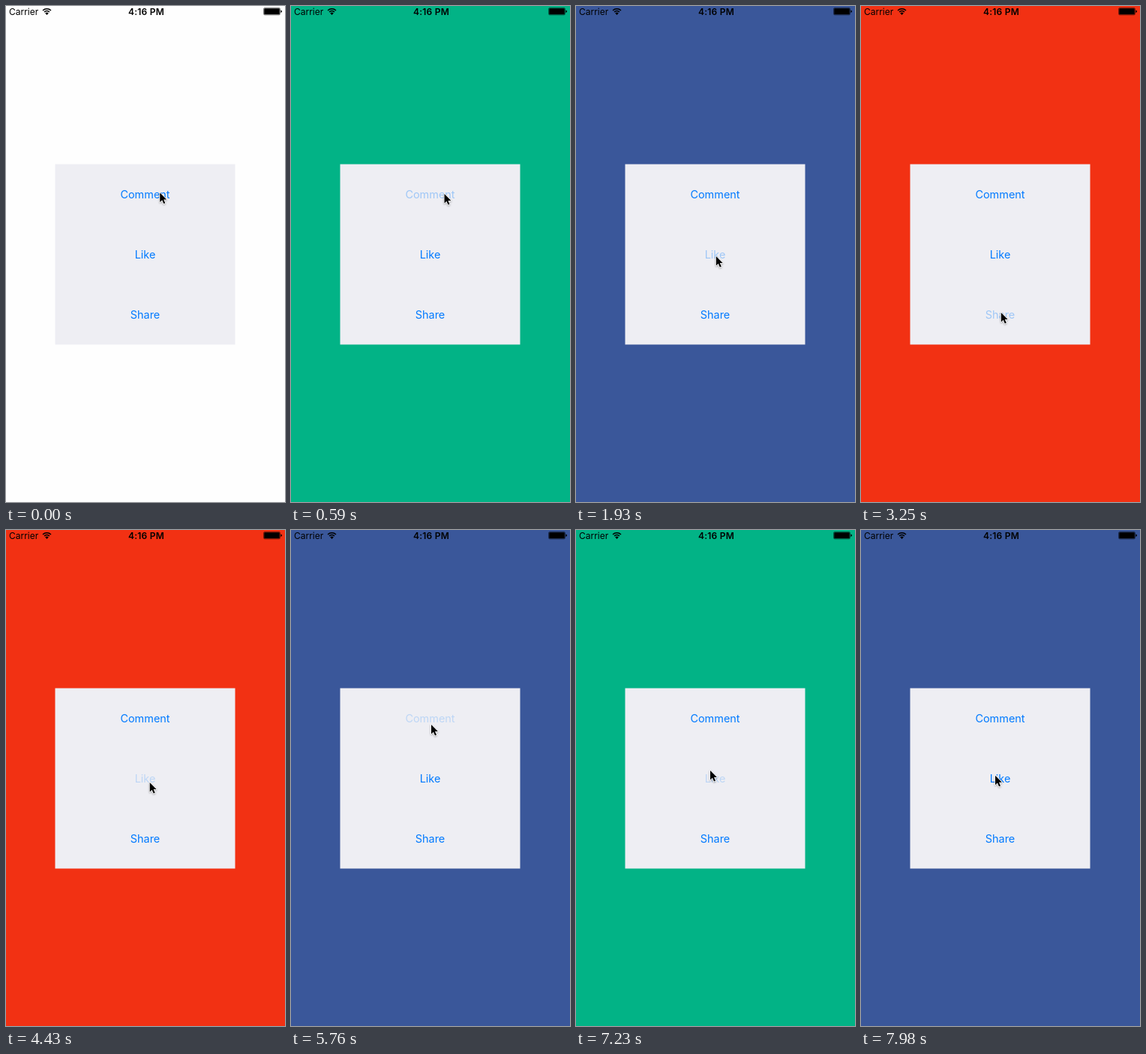
An HTML page that plays this animation: 372 px wide and 660 px high, repeating every 8 s.

```html
<!DOCTYPE html>
<html lang="en">
<head>
<meta charset="utf-8">
<title>Button colours</title>
<style>
  html, body { margin: 0; width: 100%; height: 100%; overflow: hidden; }
  svg { display: block; width: 372px; height: 660px; }
  text { font-family: Inter, Roboto, sans-serif; }
  .status { font-size: 12px; }
  .time { font-weight: 600; letter-spacing: .2px; }
  .button { font-size: 14.45px; fill: #007aff; text-anchor: middle; }
  .cursor { filter: drop-shadow(0 1px 1px rgba(0, 0, 0, .3)); }
</style>
</head>
<body>
<svg viewBox="0 0 372 660">
  <rect id="back" width="372" height="660"/>

  <text class="status" x="4" y="11.5">Carrier</text>
  <g fill="none" stroke="#000" stroke-width="1.6">
    <path d="M49.05 6.05a7.7 7.7 0 0 1 10.9 0M51.05 8.05a4.9 4.9 0 0 1 6.9 0"/>
    <path d="M54.5 11.9l-2.3-2.3a3.25 3.25 0 0 1 4.6 0z" fill="#000" stroke="none"/>
  </g>
  <text class="status time" x="187" y="11.5" text-anchor="middle">4:16 PM</text>
  <rect x="343.5" y="2.5" width="22" height="9.4" rx="1.6" fill="none" stroke="#000" stroke-width=".5"/>
  <rect x="344.2" y="3.2" width="20.6" height="8" rx=".8"/>
  <path d="M366.4 5.5q1.6.3 1.6 1.7t-1.6 1.7z"/>

  <rect x="65.5" y="210.5" width="240" height="240" fill="#eeeef3"/>
  <text class="button" x="185.5" y="256">Comment</text>
  <text class="button" x="185.5" y="336">Like</text>
  <text class="button" x="185.5" y="416">Share</text>

  <path id="cursor" class="cursor" d="M0 0V12.4L2.9 9.7L5 14.6L7 13.7L5 9H8.9Z"
    stroke="#fff" stroke-width="1.6" stroke-linejoin="round" paint-order="stroke"/>
</svg>
<script>
  const LOOP = 8000, TICK = 147.78, LEAD = 12;
  const TRAVEL = 4, PRESSED = 0.2;
  const COLORS = ['#02b386', '#3a579a', '#f23113'];

  // Pointer stops, timed in ticks; a stop with a button is also a tap.
  const stops = [
    { x: 206, y: 247, arrive: 0 },
    { x: 204.5, y: 250, arrive: 2, button: 0, down: 2, up: 4 },
    { x: 186.8, y: 333, arrive: 11, button: 1, down: 11, up: 13 },
    { x: 186.8, y: 408, arrive: 20, button: 2, down: 20, up: 22 },
    { x: 191.7, y: 336, arrive: 28, button: 1, down: 30, up: 33 },
    { x: 187, y: 259, arrive: 39, button: 0, down: 39, up: 43 },
    { x: 179, y: 320, arrive: 49, button: 1, down: 49, up: 52 },
    { x: 179, y: 328, arrive: 55 }
  ];

  const back = document.getElementById('back');
  const cursor = document.getElementById('cursor');
  const buttons = document.querySelectorAll('.button');

  const clamp = u => Math.min(1, Math.max(0, u));
  const smooth = u => u * u * (3 - 2 * u);
  const latest = test => stops.filter(test).pop();

  function tipAt(tick) {
    return stops.reduce(([x, y], stop) => {
      const e = smooth(clamp((tick - stop.arrive) / TRAVEL + 1));
      return [x + (stop.x - x) * e, y + (stop.y - y) * e];
    }, [stops[0].x, stops[0].y]);
  }

  function opacityAt(button, tick) {
    const tap = latest(stop => stop.button === button && stop.down <= tick);
    if (!tap) return 1;
    if (tick < tap.up) return PRESSED;
    return PRESSED + (1 - PRESSED) * clamp(0.16 + (tick - tap.up) / 2);
  }

  function draw(ms) {
    const tick = Math.floor((ms + LEAD) / TICK);
    const tapped = latest(stop => stop.up <= tick);
    back.setAttribute('fill', tapped ? COLORS[tapped.button] : '#fefefe');
    buttons.forEach((el, i) => el.setAttribute('opacity', opacityAt(i, tick)));
    cursor.setAttribute('transform', `translate(${tipAt(tick)})`);
  }

  const start = performance.now();
  function frame() {
    draw((performance.now() - start) % LOOP);
    requestAnimationFrame(frame);
  }
  frame();
</script>
</body>
</html>
```
